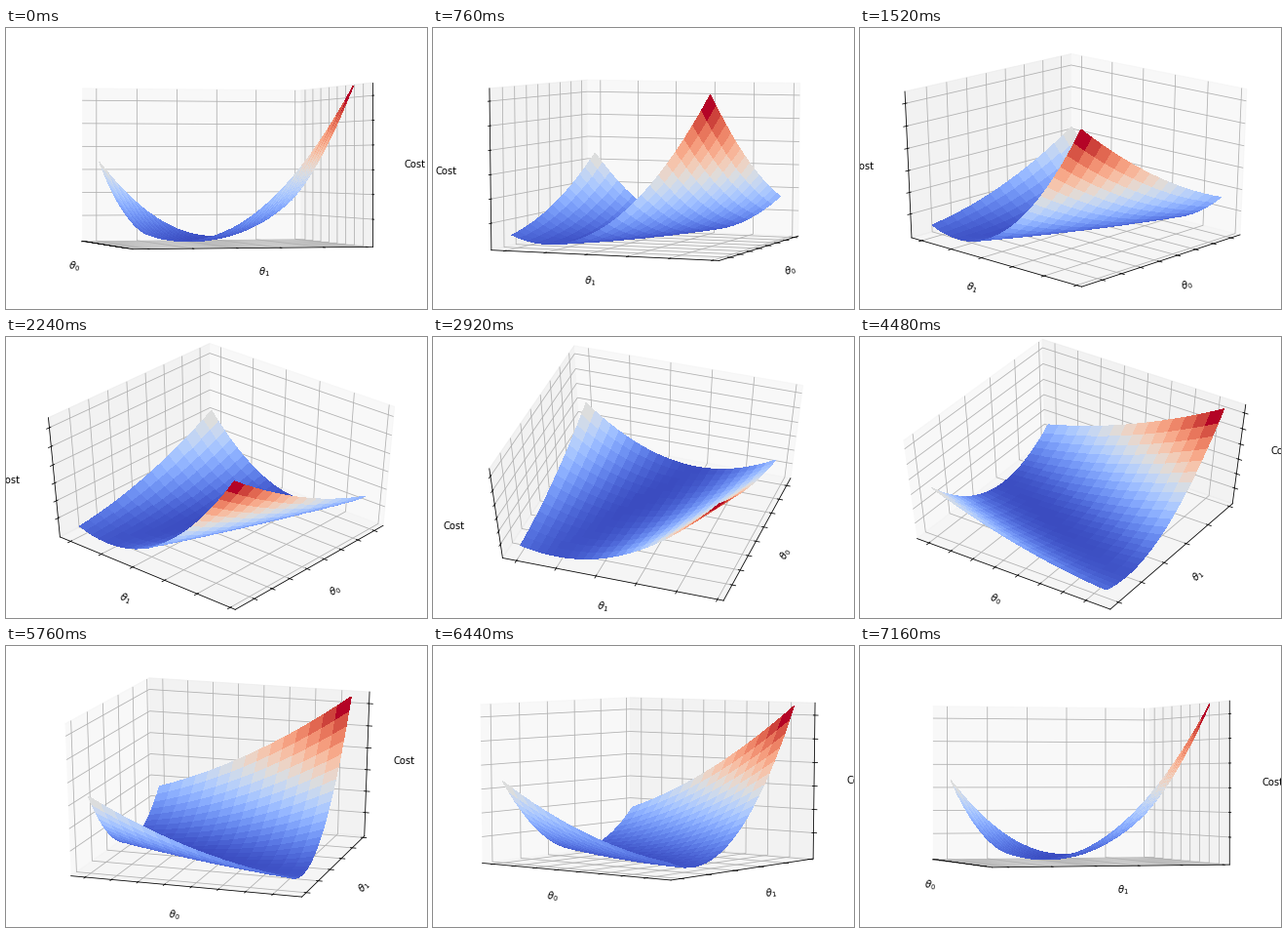
A matplotlib script that plays this animation: 432 px wide and 288 px high, repeating every 7.2 s.

```python
import numpy as np
import matplotlib.pyplot as plt
from matplotlib.animation import FuncAnimation
from mpl_toolkits.mplot3d import Axes3D

FRAMES = 180
INTERVAL = 40


class WideAxes(Axes3D):
    """3D axes stretched over the whole figure instead of a square."""

    def apply_aspect(self, position=None):
        pass


def padded(lo, hi, margin):
    """Limits with a data margin plus the small gap to the panes."""
    m = (hi - lo) * margin
    lo, hi = lo - m, hi + m
    gap = (hi - lo) / 48
    return lo - gap, hi + gap


# Least-squares cost around the best fit
theta0, theta1 = np.meshgrid(np.arange(0, 8, 0.5), np.arange(0, 5, 0.2))
p, q = theta0 - 2.73, theta1 - 2.12
cost = p**2 + 2 * 3.155 * p * q + 12.2 * q**2
cost = (cost - cost.min()) / np.ptp(cost)

fig = plt.figure(figsize=(6, 4), dpi=72, facecolor="white")
ax = WideAxes(fig, rect=(0, 0, 1, 1))
fig.add_axes(ax)
ax.set_box_aspect((1, 1, 1), zoom=np.sqrt(3) / 1.829464)

ax.plot_surface(theta0, theta1, cost, cmap="coolwarm",
                linewidth=0, antialiased=False)

ax.set_xticks(np.arange(0, 8), labels=[])
ax.set_yticks(np.arange(0, 6), labels=[])
ax.set_zticks(0.157 * (np.arange(1, 7) - 0.02), labels=[])
ax.set_xlim(*padded(0, 7.5, 0.05))
ax.set_ylim(*padded(0, 4.8, 0.05))
ax.set_zlim(*padded(0, 1, 0))
ax.set_xlabel(r"$\theta_0$")
ax.set_ylabel(r"$\theta_1$")
ax.set_zlabel("Cost")


def update(i):
    t = 2 * np.pi * i / FRAMES
    ax.view_init(elev=30 - 30 * np.cos(t), azim=-15 + 60 * np.sin(t))
    return []


anim = FuncAnimation(fig, update, frames=FRAMES, interval=INTERVAL,
                     repeat=True, repeat_delay=0, blit=False)
plt.show()
```
